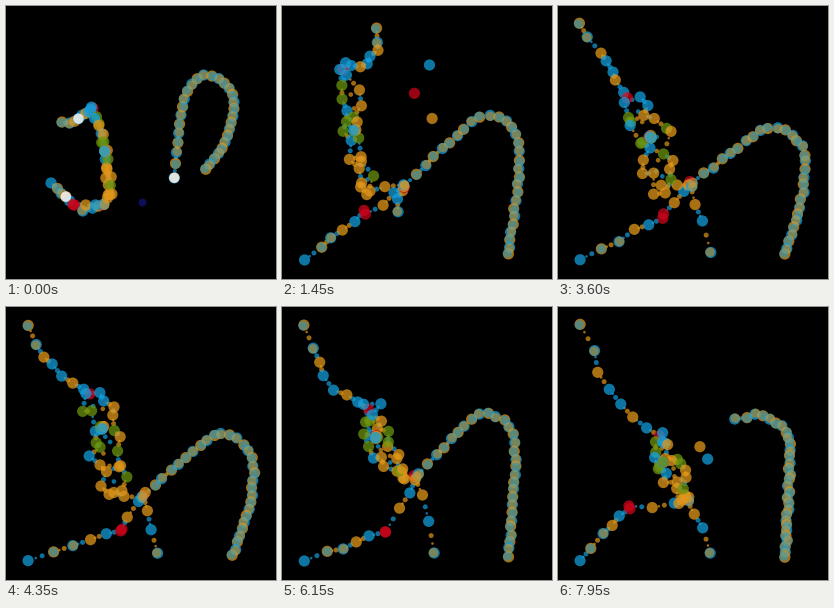
A matplotlib script for the animation above (8000 ms loop, 270 px wide and 273 px high).

```python
import numpy as np
import matplotlib.pyplot as plt
from matplotlib.animation import FuncAnimation

W, H, DPI = 270, 273, 100
STEP, COUNT = 50, 160
TIMES = [0, 1450, 2650, 3600, 5050, 6150, 7950]
rng = np.random.default_rng(7)

COLOURS = {"B": (.08, .62, .86), "O": (.88, .59, .10), "G": (.42, .58, .06), "R": (.80, .02, .10)}
TAIL, RAIL = 30, 11


def track(*pts):
    """A point moving through pts at TIMES, resting at the last one."""
    xy = np.array(pts, float)
    times = TIMES[:len(xy)]
    return lambda t: np.array([np.interp(t, times, c) for c in xy.T])


# Joints of the figure
head = track((87, 103), (61, 63), (97, 88), (72, 94), (98, 82), (89, 101), (102, 130))
waist = track((99, 145), (73, 125), (83, 137), (93, 130), (99, 112), (94, 130), (106, 155))
base = track((104, 188), (86, 185), (112, 198), (102, 182), (117, 190), (118, 168), (126, 188))
hub = track((68, 199), (82, 207), (115, 220), (105, 211), (122, 231), (102, 225), (72, 200))
fork = track((98, 199), (121, 180), (134, 202), (134, 178), (139, 198), (135, 169), (131, 193))
root = track((168, 172), (121, 180), (134, 202), (134, 178), (139, 198), (135, 169), (178, 111))
apex = track((200, 69), (208, 109), (214, 119), (217, 121), (217, 132), (204, 106), (203, 108))
elbow = track((66, 116), (93, 50), (60, 60), (52, 63), (48, 64), (50, 80), (58, 92))
hand = track((56, 116), (95, 22), (22, 18))
toe = track((77, 205), (116, 206), (152, 246))
half_width = track((1,), (6,), (6,), (12,), (13,), (9,), (7,))

# Beads that break away from the core: colour, moment, place
FLIERS = [("O", 1450, (149, 113)), ("R", 1450, (134, 87)), ("B", 1450, (149, 60)),
          ("G", 2650, (145, 129)), ("O", 7950, (143, 141)), ("B", 7950, (149, 152))]


def grow(t):
    return 1 - (1 - min(t / 1000, 1))**3


def spread(pts, n, pack=.82):
    """Place n beads along a smooth curve, closer together near its end."""
    pts = np.array(pts, float)
    p = np.vstack([2 * pts[0] - pts[1], pts, 2 * pts[-1] - pts[-2]])
    u = np.linspace(0, 1, 20, endpoint=False)[:, None]
    parts = [.5 * (2 * b + (c - a) * u + (2 * a - 5 * b + 4 * c - d) * u**2
                   + (3 * b - a - 3 * c + d) * u**3)
             for a, b, c, d in zip(p, p[1:], p[2:], p[3:])]
    line = np.vstack(parts + [pts[-1:]])
    s = np.r_[0, np.cumsum(np.hypot(*np.diff(line, axis=0).T))]
    at = np.linspace(0, 1, n)**pack * s[-1]
    return np.c_[np.interp(at, s, line[:, 0]), np.interp(at, s, line[:, 1])]


def tail(t):
    g, start, top = grow(t), root(t), apex(t)
    end = np.array([200, 163]) + g * np.array([27, 86])
    rise = start + (top - start) * (.32 + .35 * g, .76)
    bend = top + (27, 20)
    side = top + (20 + 8 * g, 65)
    return spread([start, rise, top, bend, side, end], TAIL)


def rails(t):
    mid = spread([head(t), waist(t), base(t)], RAIL, 1)
    dx, dy = np.gradient(mid, axis=0).T
    normal = np.c_[-dy, dx] / np.hypot(dx, dy)[:, None]
    wide = half_width(t) * np.sqrt(np.sin(np.linspace(.2, np.pi - .2, RAIL)))
    return mid + normal * wide[:, None], mid - normal * wide[:, None]


def fliers(t):
    home = waist(t)
    return np.array([home + (np.array(xy) - home) * np.exp(-((t - when) / 500)**2)
                     for _, when, xy in FLIERS])


def strands(t):
    low = np.array([45, 177]) + grow(t) * np.array([-23, 77])
    a, b = rails(t)
    return [tail(t),
            spread([low, hub(t)], 6),
            spread([toe(t), fork(t)], 4),
            spread([hub(t), fork(t)], 4),
            spread([fork(t), base(t)], 3),
            spread([hand(t), elbow(t), head(t)], 8),
            a, b, fliers(t)]


# Bead colours per strand; M is a blue and an orange bead overlapping
rail_kinds = ["".join(rng.choice(list("OOOGGB"), RAIL)) for _ in range(2)]
kinds = ["M" * TAIL, "BMMOBR", "MBOR", "ROBO", "MOO", "MMOBBOBR",
         *rail_kinds, "".join(f[0] for f in FLIERS)]
wobble = np.repeat([.7, 1.5, 2, 2, 2, 1.5, 3.5, 3.5, 1], [len(k) for k in kinds])
first = np.cumsum([0] + [len(k) for k in kinds])
TIPS = first[[1, 2, 5]]
wobble[TIPS] = .4
flat = "".join(kinds)
n = len(flat)

freq = rng.uniform(.2, 1.4, (2, n, 2))
phase = rng.uniform(0, 2 * np.pi, (2, n, 2))
mixed = np.array([i for i, k in enumerate(flat) if k == "M"])
shift = rng.uniform(-1, 1, (len(mixed), 2))
white = [0, first[1] + 3, first[5] + 3]

# Small beads on the links between big ones: ends, place between, radius
links = []
for s in range(1, 8):
    for i in range(first[s], first[s + 1] - 1):
        links += [(i, i + 1, .3, 1.3), (i, i + 1, .55, 2.5)]
links += [(i, i + 1, .5, 2) for i in range(4)]
links += [(first[6] + i, first[7] + i, .5, 2.3) for i in range(RAIL)]
from_bead, to_bead, frac, small_r = (np.array(c) for c in zip(*links))


def place(t):
    sway = np.sin(2 * np.pi * freq * t / 1000 + phase).sum(0)
    return np.vstack(strands(t)) + sway * wobble[:, None] * (.3 + .7 * grow(t))


def on_links(p):
    return p[from_bead] + (p[to_bead] - p[from_bead]) * frac[:, None]


fig = plt.figure(figsize=(W / DPI, H / DPI), dpi=DPI, facecolor="black")
ax = fig.add_axes([0, 0, 1, 1])
ax.set(xlim=(0, W), ylim=(H, 0))
ax.axis("off")


def dots(xy, r, cols, alpha):
    size = (2 * np.broadcast_to(r, len(xy)) * 72 / DPI)**2
    return ax.scatter(xy[:, 0], xy[:, 1], s=size, c=cols, alpha=alpha, linewidths=0)


def two_tone(i):
    return COLOURS["BO"[i % 2]]


p0 = place(0)
speck = dots(np.array([[136, 196]]), 4, [(.05, .05, .35)], 1)
small = dots(on_links(p0), small_r, [two_tone(i // 2) for i in range(len(links))], .7)
big = dots(p0, 5.6, [two_tone(i) if k == "M" else COLOURS[k] for i, k in enumerate(flat)], .75)
over = dots(p0[mixed], 4.7, [two_tone(i + 1) for i in mixed], .5)
pale = dots(p0[white], 5.2, [(.93, .93, .93)] * len(white), 1)


def draw(i):
    t = i * STEP
    p = place(t)
    big.set_offsets(p)
    over.set_offsets(p[mixed] + shift)
    small.set_offsets(on_links(p))
    pale.set_offsets(p[white])
    pale.set_alpha(max(0, .9 - t / 600))
    speck.set_offsets([[136 - t * .009, 196 - t * .055]])
    speck.set_alpha(max(0, 1 - t / 1500))
    return speck, small, big, over, pale


anim = FuncAnimation(fig, draw, frames=COUNT, interval=STEP, repeat=True, repeat_delay=0)
plt.show()
```
